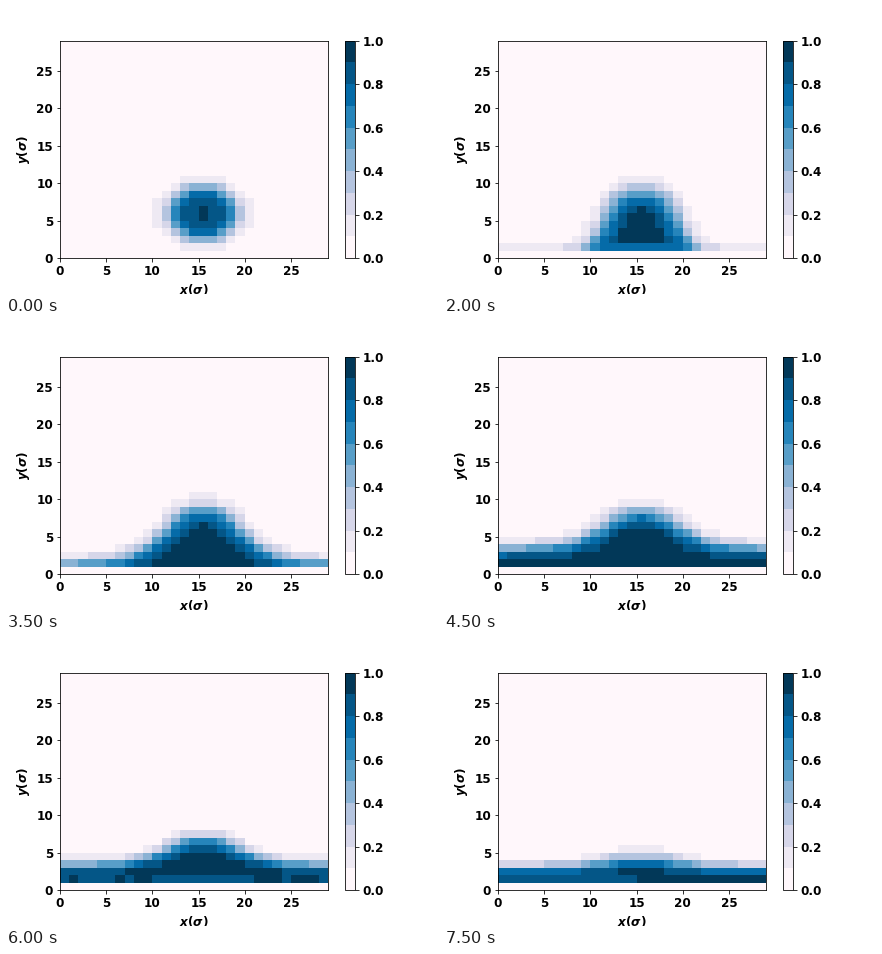
Write a matplotlib script that moves like this. It is 432 px wide and 288 px high and loops after 8 s.

```python
import numpy as np
import matplotlib.pyplot as plt
from matplotlib.animation import FuncAnimation

N = 29            # cells per side
CX = 15.5         # axis of the drop
FRAMES, INTERVAL = 16, 500

plt.rcParams.update({
    "font.family": "DejaVu Sans",
    "font.size": 12,
    "font.weight": "bold",
    "figure.subplot.bottom": 0.125,
})

centers = np.arange(N) + 0.5
X, Y = np.meshgrid(centers, centers)


def ramp(step, start, end):
    return np.clip((step - start) / (end - start), 0, 1)


def mix(a, b, k):
    return a + (b - a) * k


def interface(dist, width, density):
    return 0.5 * density * (1 - np.tanh(dist / width))


def drop(step):
    """Free drop that sinks to the wall and grows a foot."""
    k = ramp(step, 0, 2)
    yc = mix(6, 5.5, k)
    below = np.clip((yc - Y) / 4, 0, 1)
    dx = (X - CX) * (1 - 0.3 * k * below ** 3)
    dist = np.hypot(dx, mix(1.07, 1, k) * (Y - yc)) - 3.71
    return interface(dist, mix(1.5, 1.55, k), mix(0.928, 0.965, k))


def bell(x, step):
    k = ramp(step, 4, 7)
    return 1 / (1 + np.abs((x - CX) / mix(4.1, 4.7, k)) ** mix(4.5, 3, k))


def cap(step):
    """Cap on the wall that spreads and sinks into a growing film."""
    u = ramp(step, 4, 15)
    peak = 8.8 - 4.55 * u ** 2.7
    film = 3.28 * ramp(step, 4, 9) ** 2 - 0.33 * ramp(step, 12, 15)

    def surface(x):
        return mix(film, peak, bell(x, step))

    # signed distance to the liquid surface
    xs = np.linspace(-4, N + 4, 500)
    dist = np.hypot(X[..., None] - xs, Y[..., None] - surface(xs)).min(axis=-1)
    dist *= np.sign(Y - surface(X))

    film_width = mix(1.6, 1.05, ramp(step, 4, 12))
    width = mix(film_width, 1.9 - 0.6 * u, bell(X, step))
    rho = interface(dist, width, 0.98)
    rho[1] = np.minimum(rho[1], mix(0.79, 1, ramp(step, 4, 7)))
    return rho


def wall_layer(step):
    """Fluctuating cells that settle with the dense side on the right."""
    settle = ramp(step, 12, 15)
    noise = np.random.default_rng(step).uniform(-0.04, 0.04, N)
    shade = bell(centers, step)
    rough = noise * (1 - shade) - 0.03 * shade
    slope = 0.1 * (centers - 15) / N
    return 0.9 + mix(rough, slope, settle)


def field(step):
    rho = mix(drop(step), cap(step), ramp(step, 2, 4))
    rho[1] = mix(rho[1], wall_layer(step), ramp(step, 9, 12))
    rho[0] = 0
    return rho


fig, ax = plt.subplots(figsize=(6, 4), dpi=72)
edges = np.arange(N + 1)
mesh = ax.pcolormesh(edges, edges, field(0), cmap=plt.get_cmap("PuBu", 10),
                     vmin=0, vmax=1)
fig.colorbar(mesh, ax=ax, ticks=np.linspace(0, 1, 6))
ax.set(xlim=(0, N), ylim=(0, N),
       xticks=range(0, N, 5), yticks=range(0, N, 5))

label = r"$\mathbfit{%s}\mathbf{(}\mathbfit{\sigma}\mathbf{)}$"
ax.set_xlabel(label % "x")
ax.set_ylabel(label % "y")


def update(step):
    mesh.set_array(field(step))
    return [mesh]


anim = FuncAnimation(fig, update, frames=FRAMES, interval=INTERVAL,
                     repeat=True, repeat_delay=0)
plt.show()
```
